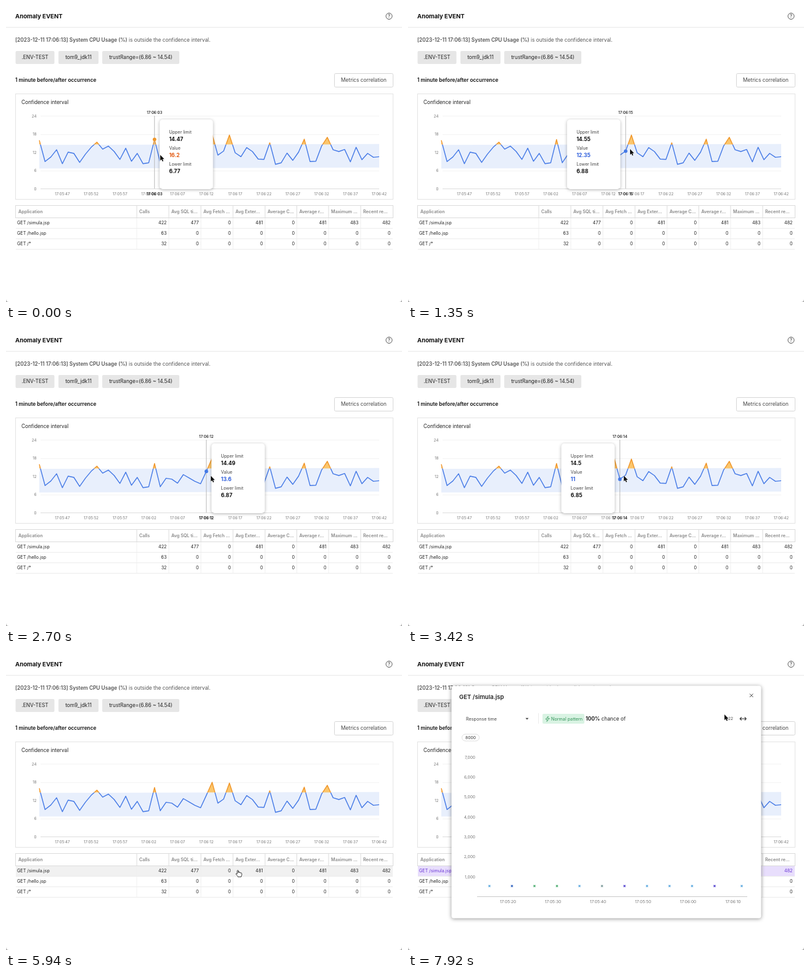
An HTML page that plays this animation: 642 by 480 pixels, repeating every 8 s.

```html
<!DOCTYPE html>
<html lang="en">
<head>
<meta charset="utf-8">
<title>Anomaly event</title>
<style>
  html, body { margin: 0; width: 100%; height: 100%; overflow: hidden; background: #fff; }
  svg { display: block; width: 100vw; height: 100vh; font-family: Inter, "Open Sans", sans-serif; }
  text { white-space: pre; }
  .tip { filter: drop-shadow(0 1px 2.5px rgba(0,0,0,.3)); }
  .modal { filter: drop-shadow(0 1px 3px rgba(0,0,0,.42)); }
</style>
</head>
<body>
<svg id="stage" viewBox="0 0 642 480"></svg>
<script>
const LOOP = 8000;
const LEFT = 54, RIGHT = 605, STEP = (RIGHT - LEFT) / 59, LIMIT_Y = 224.6;
const VALUES = [
  15.9, 8.9, 10.4, 12.8, 8.2, 12, 11.6, 8.6, 11.3, 13.6, 15.3, 13, 14, 12.2, 9.6,
  13.3, 9, 11.6, 8.2, 8.5, 16.2, 8.5, 11.3, 11, 9.7, 12.5, 11.4, 10.3, 9.5, 13.6,
  17.9, 11, 12.35, 17.65, 11.8, 10.5, 13.5, 12.2, 9.7, 9.6, 15.1, 8, 8.5, 11.7, 9.3,
  12, 16.3, 8.9, 9, 14, 16.9, 12.8, 12.2, 12.9, 8.8, 13.6, 9.5, 11.6, 10.3, 10.5];
const LIMITS = { 20: [14.47, 6.77], 29: [14.49, 6.87], 32: [14.55, 6.88], 33: [14.6, 6.87] };
const COLUMNS = [16, 212, 264, 316, 368, 420, 471.5, 523, 575, 627];

// Pointer stops: time, x, y
const POINTER = [
  [0, 250, 241.5], [1350, 360, 232], [1620, 363.5, 236], [1980, 363.5, 236],
  [2700, 332, 236.5], [3060, 336, 237], [3240, 336, 237], [3600, 363.5, 235.5],
  [5220, 363.5, 235.5], [5850, 376, 351], [6030, 376, 351], [6480, 350, 353],
  [7380, 350, 353], [7900, 513, 98], [LOOP, 513, 98]];

const px = i => LEFT + i * STEP;
const py = v => 296 - v * 118 / 24;
const clock = s => {
  const pad = n => String(n).padStart(2, '0');
  return `17:${pad(Math.floor(s / 60))}:${pad(s % 60)}`;
};

// y is the optical middle of the line
const text = (x, y, str, size = 8.3, fill = '#222', weight = 400, anchor = 'start') =>
  `<text x="${x}" y="${y + size * 0.36}" font-size="${size}" fill="${fill}" font-weight="${weight}" text-anchor="${anchor}">${str}</text>`;
const rect = (x, y, w, h, fill, stroke = 'none', r = 0, extra = '') =>
  `<rect x="${x}" y="${y}" width="${w}" height="${h}" rx="${r}" fill="${fill}" stroke="${stroke}" ${extra}/>`;
const path = (d, stroke, width = 1, fill = 'none', extra = '') =>
  `<path d="${d}" stroke="${stroke}" stroke-width="${width}" fill="${fill}" ${extra}/>`;
const range = (n, f) => Array.from({ length: n }, (_, i) => f(i)).join('');

function header() {
  const chip = (x, w, str) => rect(x, 73, w, 21, '#e6e6e6', 'none', 2) +
    text(x + w / 2, 83.5, str, 8.3, '#222', 400, 'middle');
  return text(15, 16.5, 'Anomaly EVENT', 9.6, '#111', 700) +
    path('M0 34.5H642', '#e8e8e8') +
    '<circle cx="621" cy="16.5" r="5" fill="none" stroke="#555"/>' +
    text(621, 16.5, '?', 7.4, '#555', 600, 'middle') +
    text(15, 55.5, '<tspan font-weight="600">[2023-12-11 17:06:13] System CPU Usage (%)</tspan> is outside the confidence interval.', 8.3, '#555') +
    chip(15.5, 63, '.ENV-TEST') + chip(85, 65, 'tom9_jdk11') + chip(156, 125, 'trustRange=(6.86 ~ 14.54)') +
    text(15, 120.5, '1 minute before/after occurrence', 8.3, '#111', 600) +
    rect(532.5, 109.5, 95, 22, '#fff', '#d6d6d6', 2) +
    text(580, 120.5, 'Metrics correlation', 8.3, '#444', 400, 'middle');
}

function chart() {
  const line = 'M' + VALUES.map((v, i) => `${px(i).toFixed(1)} ${py(v).toFixed(1)}`).join('L');
  return `<clipPath id="above"><rect x="50" y="170" width="560" height="${LIMIT_Y - 170}"/></clipPath>
    <clipPath id="below"><rect x="50" y="${LIMIT_Y}" width="560" height="80"/></clipPath>` +
    rect(15.5, 142.5, 612, 171, '#fff', '#e4e4e4') +
    text(25, 156.5, 'Confidence interval', 8.25) +
    range(5, k => text(49.5, 178.5 + k * 29.5, 24 - k * 6, 6.2, '#777', 400, 'end') +
      path(`M56 ${Math.round(178 + k * 29.5) + .5}H605`, k == 4 ? '#dcdcdc' : '#f3f3f3')) +
    path('M54 225.2L605 223.8V262L54 263.4Z', 'none', 0, '#e8effc') +
    range(12, k => text(px(4 + 5 * k), 304.8, clock(347 + 5 * k), 6.1, '#777', 400, 'middle')) +
    path(line + 'V296H54Z', 'none', 0, '#fbc66c', 'clip-path="url(#above)"') +
    path(line, '#4479e6', 1.4, 'none', 'clip-path="url(#below)" stroke-linejoin="round"') +
    path(line, '#f0962a', 1.4, 'none', 'clip-path="url(#above)" stroke-linejoin="round"');
}

function table() {
  const heads = ['Application', 'Calls', 'Avg SQL ti...', 'Avg Fetch ...', 'Avg Exter...', 'Average C...', 'Average r...', 'Maximum ...', 'Recent re...'];
  const rows = [
    ['GET /simula.jsp', 422, 477, 0, 481, 0, 481, 483, 482],
    ['GET /hello.jsp', 63, 0, 0, 0, 0, 0, 0, 0],
    ['GET /*', 32, 0, 0, 0, 0, 0, 0, 0]];
  return rect(16, 343.5, 611, 17, 'none', 'none', 0, 'id="row"') +
    rect(15.5, 323.5, 612, 20, 'none', '#dcdcdc') +
    COLUMNS.slice(1, 9).map(x => path(`M${x} 324V343`, '#dcdcdc') + path(`M${x} 344V394`, '#efefef')).join('') +
    heads.map((h, c) => text(COLUMNS[c] + 4, 333.8, h, 7.2, '#888', 600)).join('') +
    rows.map((row, r) => {
      const y = 351.8 + r * 17;
      const cells = row.map((v, c) => c
        ? text(COLUMNS[c + 1] - 3.5, y, v, 7.2, 'inherit', 400, 'end')
        : text(18, y, v, 7.2, 'inherit')).join('');
      return `<g fill="#222" id="cells${r}">${cells}</g>` + path(`M16 ${360.5 + r * 17}H627`, '#ececec');
    }).join('').replaceAll('fill="inherit"', '');
}

function tooltip(i) {
  const x = px(i), value = VALUES[i], y = py(value);
  const [upper, lower] = LIMITS[i] || [14.5, 6.85];
  const over = value > upper;
  const left = x < (LEFT + RIGHT) / 2 ? x + 8.3 : x - 95;
  const entry = (y, label, v, fill = '#111') =>
    text(left + 15.3, y, label, 7.1, '#444') + text(left + 15.3, y + 11.2, v, 8.6, fill, 700);
  return path(`M${x} 178V296`, '#b8b8b8') +
    text(x, 172.8, clock(343 + i), 6.1, '#111', 500, 'middle') +
    text(x, 304.8, clock(343 + i), 6.1, '#111', 600, 'middle') +
    `<circle cx="${x}" cy="${y}" r="2.9" fill="${over ? '#f0962a' : '#4479e6'}"/>` +
    rect(left, 184, 86.5, 113, '#fff', 'none', 5, 'class="tip"') +
    entry(204.6, 'Upper limit', upper) +
    entry(230.6, 'Value', value, over ? '#e25a12' : '#2f5fdc') +
    entry(256.8, 'Lower limit', lower);
}

function modal() {
  const sky = '#62ace0', navy = '#3566c0', green = '#4fae72', gray = '#7f9c9c', indigo = '#5848d0';
  const colors = [sky, navy, green, green, sky, gray, indigo, sky, sky, sky, indigo, sky];
  const dots = colors.map((c, k) => {
    const x = k < 11 ? 132 + k * 36.5 : 541;
    return path(`M${x - 1.5} 374.7l3 3m0-3l-3 3`, c, 1.4);
  }).join('');
  return rect(70.5, 51.5, 502, 377, '#fff', 'none', 4, 'class="modal"') +
    text(83, 70, 'GET /simula.jsp', 9.6, '#222', 600) +
    path('M554 64.5l5.5 5.5m0-5.5l-5.5 5.5', '#444') +
    text(94, 105, 'Response time', 7.2, '#444') +
    path('M190.5 103.8h5l-2.5 2.8z', 'none', 0, '#444') +
    path('M538.5 105h9.5M540.7 102.5L538.2 105l2.5 2.5M545.8 102.5l2.5 2.5-2.5 2.5', '#333', 1.1) +
    rect(87.5, 130, 28, 11, '#fff', '#dedede', 5.5) +
    text(101.5, 135.5, '8000', 6.7, '#333', 400, 'middle') +
    range(7, k => text(109, 361.2 - k * 32.3, `${k + 1},000`, 6.6, '#777', 400, 'end')) +
    path('M112 393.5H550', '#c9c9c9') +
    range(6, k => text(162 + k * 73, 402, clock(320 + 10 * k), 6.6, '#777', 400, 'middle')) +
    `<g id="loading">` +
      text(527, 105, '0', 6.6, '#444', 400, 'end') +
      path('M85 89.5h4.5', '#4a58d8', 1.3) +
      rect(202, 198, 239, 108, '#fff', 'none', 2, 'class="tip"') +
      text(321.3, 219, 'Getting data from server.', 9.5, '#222', 400, 'middle') +
      text(321, 239.8, 'If your search takes a long time, you can improve your speed', 7.1, '#555', 400, 'middle') +
      text(321, 249, 'by adjusting your search criteria.', 7.1, '#555', 400, 'middle') +
      rect(281.5, 268.5, 80, 22, '#fff', '#d8d8d8', 2) +
      text(321.3, 279.8, 'Stop searching', 8.3, '#444', 400, 'middle') +
    `</g><g id="loaded">` + text(527, 105, '422', 6.6, '#444', 400, 'end') + dots +
    `</g><g id="pattern">` +
      path('M211.5 96V113', '#ececec') +
      rect(218, 97, 68, 16, '#d9f3e3', 'none', 2) +
      path('M227.3 101l-4.3 4.8h2.9l-.9 3.7 4.4-5h-3z', '#3a9a60', .8, 'none', 'stroke-linejoin="round"') +
      text(232, 105, 'Normal pattern', 7.2, '#2f9156') +
      text(288, 105.3, '<tspan font-weight="700">100%</tspan> chance of', 8.3) +
    `</g>`;
}

const ARROW = path('M0 0V9.2L2.1 7.3 3.6 10.6 5.2 9.9 3.8 6.7H6.6Z', '#fff', .8, '#111', 'id="arrow" paint-order="stroke"');
const HAND = path('M-1.1 4.7V.6C-1.1-.6.7-.6.7.6V3.6C1-.0 2.6 2.6 2.7 3.9 3 2.9 4.5 3 4.6 4.4 5 3.6 6.2 3.9 6.2 5.2V7.3C6.2 8.5 5.3 9 5.2 10.4H-.1C-.3 8.9-1.8 8-2.9 6.2-3.7 4.9-2.4 4.3-1.1 5.8Z',
  '#222', .9, '#fff', 'id="hand" stroke-linejoin="round"');

const stage = document.getElementById('stage');
stage.innerHTML = rect(0, 0, 642, 480, '#fff') + header() + chart() + table() +
  '<g id="hover"></g>' + `<g id="modal">${modal()}</g>` +
  path('M0 475Q0 480 5 480H0ZM642 475Q642 480 637 480H642Z', 'none', 0, '#aaa') +
  `<g id="pointer">${ARROW}${HAND}</g>`;

const el = id => document.getElementById(id);
const show = (id, on) => el(id).setAttribute('display', on ? 'inline' : 'none');

function pointerAt(t) {
  const k = POINTER.findIndex((p, i) => i && t <= p[0]);
  const [t0, x0, y0] = POINTER[k - 1], [t1, x1, y1] = POINTER[k];
  const u = (t - t0) / (t1 - t0), e = u * u * (3 - 2 * u);
  return [x0 + (x1 - x0) * e, y0 + (y1 - y0) * e];
}

let hovered = null;
function draw(t) {
  const [x, y] = pointerAt(t);
  const opened = t >= 6740, loaded = t >= 7150;
  const overRow = !opened && y > 343;

  const index = y < 296 && !opened ? Math.floor((x - LEFT) / STEP) : -1;
  if (index !== hovered) {
    hovered = index;
    el('hover').innerHTML = index < 0 ? '' : tooltip(index);
  }
  el('row').setAttribute('fill', opened ? '#e8defc' : overRow ? '#f1f1f1' : 'none');
  el('cells0').setAttribute('fill', opened ? '#6a35d6' : '#222');

  show('modal', opened);
  show('loading', !loaded);
  show('loaded', loaded);
  show('pattern', t >= 7380);
  show('arrow', !overRow);
  show('hand', overRow);
  el('pointer').setAttribute('transform', `translate(${x.toFixed(2)} ${y.toFixed(2)})`);
}

const start = performance.now();
function frame() {
  draw((performance.now() - start) % LOOP);
  requestAnimationFrame(frame);
}
frame();
</script>
</body>
</html>
```
